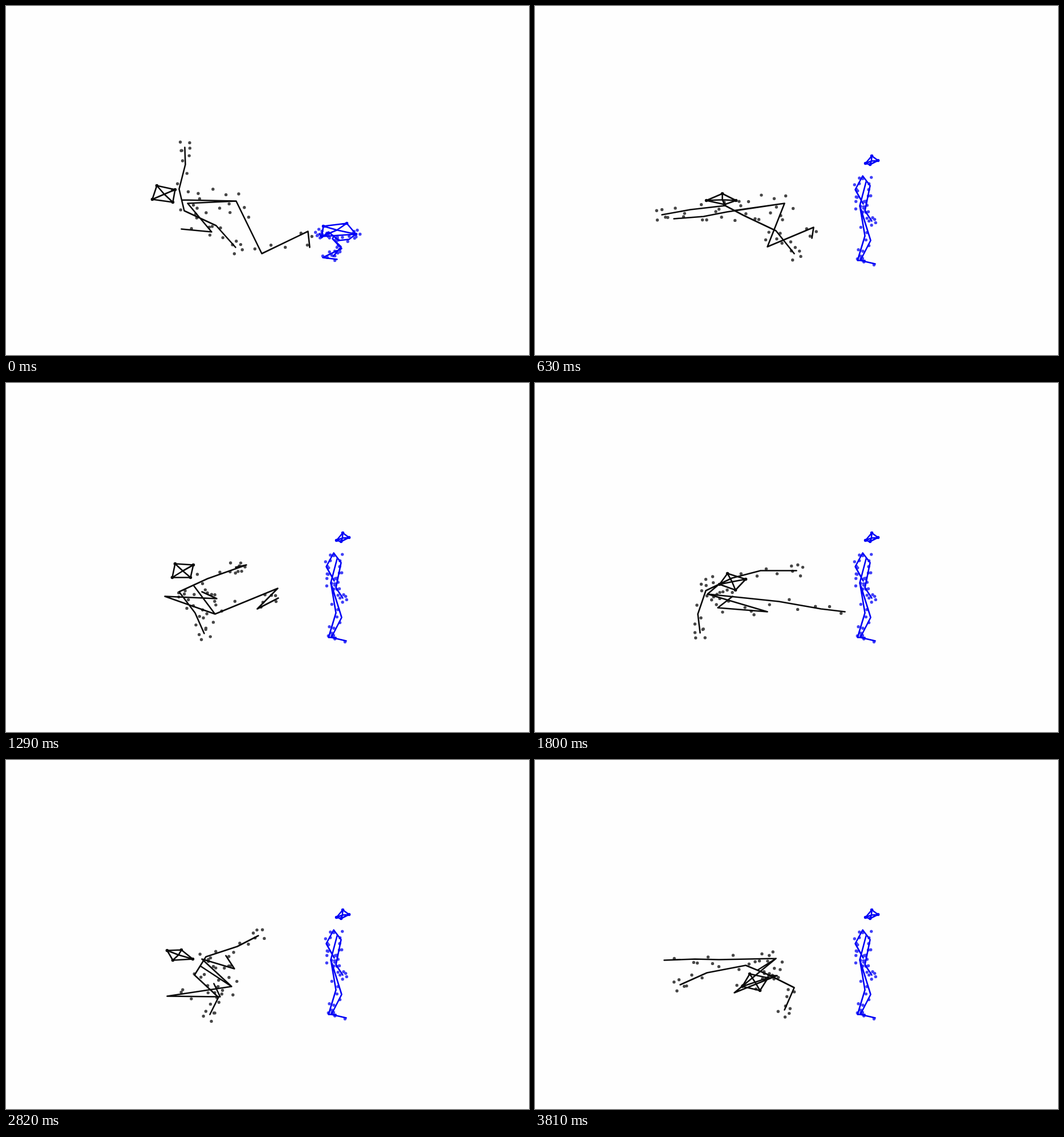
Recreate the animation shown at these times as an HTML page. Size 917 by 611 pixels, loop 3840 ms.

```html
<!DOCTYPE html>
<html lang="en">
<head>
<meta charset="utf-8">
<title>Motion capture dancers</title>
<style>
html, body { margin: 0; width: 100%; height: 100%; overflow: hidden; background: #fefefe; }
svg { display: block; width: 100%; height: 100%; }
path { fill: none; stroke-linecap: round; stroke-linejoin: round; }
.bone { stroke-width: 2.6; }
.joint { stroke-width: 5.6; }
.marker { stroke-width: 5.4; stroke-opacity: .75; }
</style>
</head>
<body>
<svg viewBox="0 0 917 611">
  <g id="dancer" stroke="#0a0a0a" transform="translate(.5 .5)"></g>
  <g id="watcher" stroke="#0000f5" transform="translate(.5 .5)"></g>
</svg>
<script>
const LOOP = 3840, STEP = 30;

// Points of a body: head 0-3, pelvis 4, arms 5-10, legs 11-16.
// The middle of the head and the neck follow from these.
const PELVIS = 4, CROWN = 17, NECK = 18;
const ARMS = [[5, 6, 7], [8, 9, 10]];
const LEGS = [[11, 12, 13], [14, 15, 16]];
const BONES = [
  [0, 1, 2, 3, 0], [0, CROWN, 2], [1, CROWN, 3],
  [...ARMS[0]].reverse().concat(NECK, ARMS[1]),
  [NECK, PELVIS], ...LEGS.map(leg => [PELVIS, ...leg])
];

const pose = (t, ...parts) => ({ t, xy: parts.flat() });

// Head, pelvis, arms (shoulder, elbow, wrist), legs (knee, ankle, toe)
const dance = [
  pose(0, [264,314, 296,321, 292,343, 256,338], [403,341],
    [303,320, 314,277, 313,247], [312,358, 368,384, 402,422],
    [318,345, 360,395, 307,390], [448,433, 529,394, 532,422]),
  pose(630, [328,328, 352,340, 332,347, 300,340], [437,345],
    [333,349, 272,356, 222,365], [365,366, 422,393, 454,433],
    [336,360, 295,368, 243,372], [407,421, 488,387, 485,406]),
  pose(1290, [296,316, 328,318, 323,340, 291,340], [366,404],
    [303,365, 331,402, 347,438], [353,342, 421,318, 402,322],
    [278,373, 369,377, 343,365], [476,359, 440,395, 477,376]),
  pose(1800, [337,333, 369,343, 351,362, 323,352], [302,369],
    [299,363, 285,404, 289,437], [345,341, 395,328, 458,328],
    [407,400, 320,393, 346,373], [427,382, 501,395, 543,400]),
  pose(2250, [380,365, 394,385, 366,398, 353,378], [314,345],
    [325,377, 274,404, 274,433], [353,345, 357,300, 388,260],
    [404,402, 345,371, 394,385], [404,362, 505,382, 543,396]),
  pose(2820, [282,333, 307,332, 327,348, 292,350], [395,396],
    [330,376, 372,415, 357,445], [350,344, 405,326, 442,307],
    [282,413, 375,414, 364,391], [343,348, 400,365, 385,342]),
  pose(3810, [376,374, 408,381, 394,403, 363,396], [422,347],
    [369,359, 301,372, 254,393], [410,376, 454,398, 437,437],
    [322,349, 280,348, 226,350], [349,407, 424,377, 408,377])
];

const rise = [
  pose(0, [556,385, 597,380, 613,399, 553,403], [572,407],
    [565,395, 553,405, 549,398], [583,410, 601,408, 613,399],
    [588,424, 555,440, 580,443], [587,421, 573,438, 580,430]),
  pose(570, [590,262, 601,270, 587,277, 579,275], [569,349],
    [574,297, 561,321, 575,346], [587,314, 578,358, 590,376],
    [578,402, 565,445, 578,445], [588,410, 570,445, 596,451])
];

// Cubic Hermite spline through the poses
function blend(poses, t) {
  const last = poses.length - 1;
  if (t >= poses[last].t) return poses[last].xy;
  const i = poses.findIndex((p, n) => n < last && t < poses[n + 1].t);
  const a = poses[i], b = poses[i + 1];
  const before = poses[Math.max(i - 1, 0)], after = poses[Math.min(i + 2, last)];
  const span = b.t - a.t, u = (t - a.t) / span, v = 1 - u;
  const ka = span / (b.t - before.t), kb = span / (after.t - a.t);
  return a.xy.map((p, n) => {
    const q = b.xy[n];
    const da = (q - before.xy[n]) * ka, db = (after.xy[n] - p) * kb;
    return p * v * v * (1 + 2 * u) + da * u * v * v + q * u * u * (3 - 2 * u) - db * u * u * v;
  });
}

function skeleton(xy) {
  const pts = [];
  for (let i = 0; i < xy.length; i += 2) pts.push([xy[i], xy[i + 1]]);
  const middle = (...ids) => [0, 1].map(k => ids.reduce((s, i) => s + pts[i][k], 0) / ids.length);
  pts[CROWN] = middle(0, 1, 2, 3);
  pts[NECK] = middle(ARMS[0][0], ARMS[1][0]);
  return pts;
}

function random(seed) {
  return () => {
    seed = (seed * 16807) % 2147483647;
    return seed / 2147483647;
  };
}

// Loose markers: each rides on a bone, a little to one side of it
function suit(seed, size) {
  const rnd = random(seed), markers = [];
  const strew = (from, to, count, spread, over = 0) => {
    for (let i = 0; i < count; i++) {
      const along = (i + .2 + .6 * rnd()) / count * (1 + 2 * over) - over;
      const side = (i % 2 ? 1 : -1) * spread * size * (.3 + .7 * rnd());
      markers.push({ from, to, along, side, ahead: 0 });
    }
  };
  const ring = (from, to, count, radius) => {
    for (let i = 0; i < count; i++) {
      const angle = (i + rnd()) / count * Math.PI * 2, r = radius * size;
      markers.push({ from, to, along: 1, side: r * Math.sin(angle), ahead: r * (.3 + Math.cos(angle)) });
    }
  };
  strew(NECK, PELVIS, 12, 22, .2);
  for (const [shoulder, elbow, wrist] of ARMS) {
    strew(shoulder, elbow, 2, 9);
    strew(elbow, wrist, 3, 9);
    ring(elbow, wrist, 4, 10);
  }
  for (const [knee, ankle, toe] of LEGS) {
    strew(PELVIS, knee, 2, 12);
    strew(knee, ankle, 3, 8);
    strew(ankle, toe, 2, 6, .2);
  }
  return markers;
}

function place(pts, { from, to, along, side, ahead }) {
  const [x, y] = pts[from], dx = pts[to][0] - x, dy = pts[to][1] - y;
  const len = Math.hypot(dx, dy) || 1, d = along + ahead / len, s = side / len;
  return [x + dx * d - dy * s, y + dy * d + dx * s];
}

const at = p => p.map(n => n.toFixed(1)).join(" ");
const dots = pts => pts.map(p => `M${at(p)}h.01`).join("");
const lines = pts => BONES.map(b => "M" + b.map(i => at(pts[i])).join("L")).join("");

function figure(id, poses, markers) {
  const group = document.getElementById(id);
  const [marker, bone, joint] = ["marker", "bone", "joint"].map(name => {
    const path = document.createElementNS("http://www.w3.org/2000/svg", "path");
    path.setAttribute("class", name);
    return group.appendChild(path);
  });
  return t => {
    const pts = skeleton(blend(poses, t));
    marker.setAttribute("d", dots(markers.map(m => place(pts, m))));
    bone.setAttribute("d", lines(pts));
    joint.setAttribute("d", dots(pts.slice(0, 4)));
  };
}

const figures = [
  figure("dancer", dance, suit(4711, 1)),
  figure("watcher", rise, suit(1234, .6))
];
const start = performance.now();

function draw(now) {
  const time = Math.max(0, now - start) % LOOP;
  const t = Math.floor(time / STEP) * STEP;
  figures.forEach(f => f(t));
  requestAnimationFrame(draw);
}
draw(start);
</script>
</body>
</html>
```
